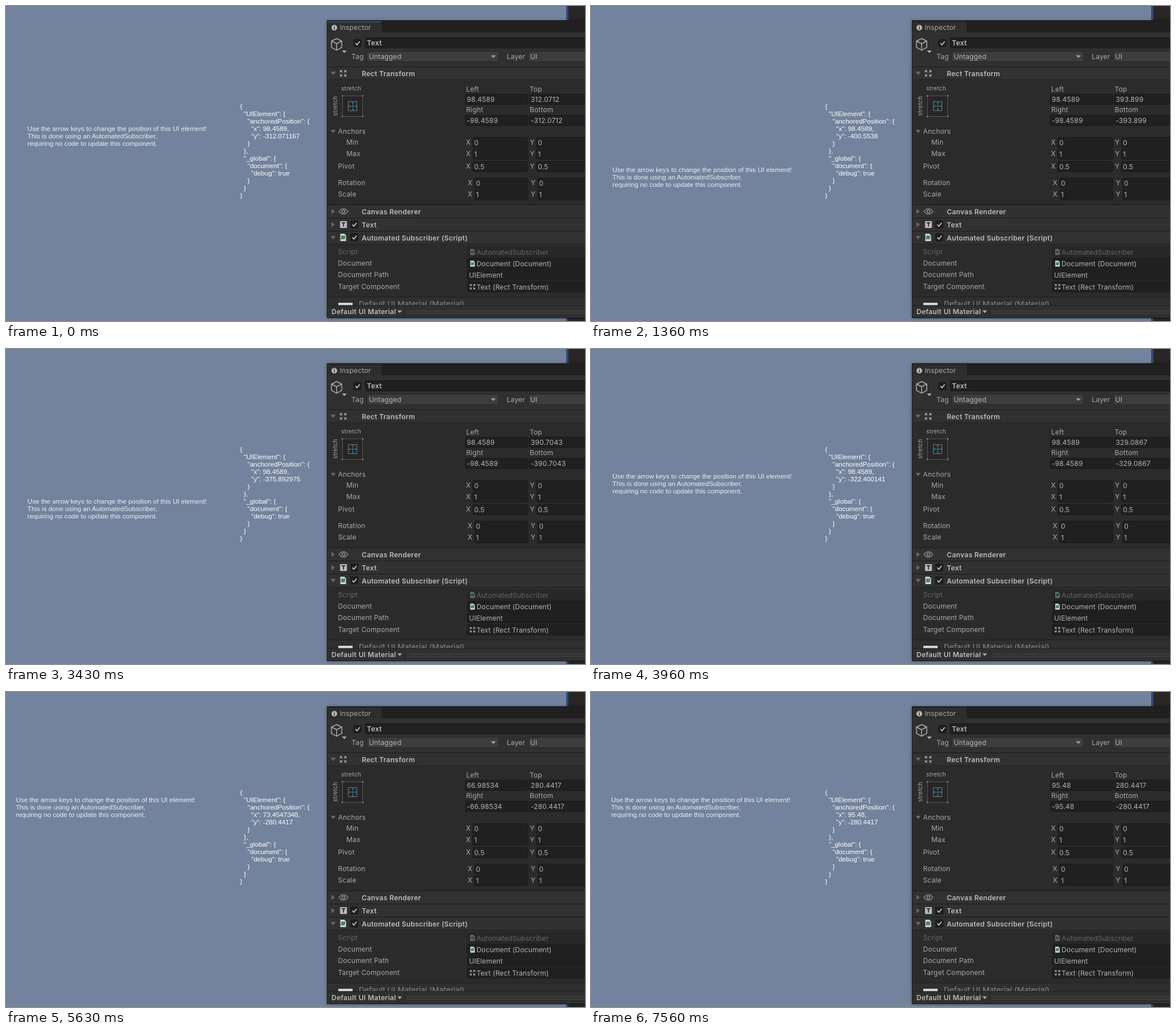
Write an HTML page that moves like this. It is 1014 px wide and 552 px high and loops after 8000 ms.

```html
<!DOCTYPE html>
<html lang="en">
<head>
<meta charset="utf-8">
<title>Inspector</title>
<style>
  html, body { margin: 0; width: 100%; height: 100%; overflow: hidden; background: #74839d; }
  svg { display: block; width: 1014px; height: 552px; }
  text { font: 12px Inter, sans-serif; letter-spacing: .15px; fill: #a9a9a9; white-space: pre; }
  .bold { font-weight: 600; letter-spacing: .3px; fill: #bcbcbc; }
  .value { fill: #b4b4b4; }
  .dim { fill: #666; }
  .tiny { font-size: 10px; letter-spacing: .3px; }
  .wide { font-size: 13.3px; fill: #8a8a8a; }
  .scene { font: 11.65px "Liberation Sans", Arial, sans-serif; letter-spacing: 0; fill: #fff; }
  .soft { fill: #eaedf1; }
</style>
</head>
<body>
<svg id="stage" viewBox="0 0 1014 552">
  <defs>
    <filter id="blur" x="-10%" y="-10%" width="120%" height="120%"><feGaussianBlur stdDeviation="3"/></filter>
    <clipPath id="materialClip"><rect x="563" y="511" width="451" height="13.5"/></clipPath>
  </defs>
</svg>
<script>
const stage = document.getElementById('stage');

function add(tag, attrs, parent = stage) {
  const node = document.createElementNS('http://www.w3.org/2000/svg', tag);
  for (const key in attrs) node.setAttribute(key, attrs[key]);
  parent.appendChild(node);
  return node;
}
const box = (x, y, width, height, fill, extra) => add('rect', { x, y, width, height, fill, ...extra });
const path = (d, fill, stroke = 'none', width = 1) =>
  add('path', { d, fill, stroke, 'stroke-width': width });
function label(x, y, content, cls = '', parent = stage) {
  const node = add('text', { x, y, class: cls }, parent);
  node.textContent = content;
  return node;
}
function field(x, y, content, end = 1020) {
  box(x + .5, y - 8.5, end - x - .5, 18, '#202020', { rx: 2.5, stroke: '#191919' });
  return label(x + 3, y + 5, content, 'value');
}
function foldout(y, open) {
  path(open ? `M568.5 ${y - 3}h9l-4.5 6z` : `M570 ${y - 4.5}v9l6 -4.5z`, '#666');
}
function checkbox(x, y) {
  box(x - 6.5, y - 6.5, 13, 13, '#1f1f1f', { rx: 2, stroke: '#171717' });
  path(`M${x - 3.5} ${y}l2.7 3l4.8 -6`, 'none', '#d0d0d0', 1.6);
}
function scriptIcon(x, y, scale = 1, opacity = 1) {
  const g = add('g', { transform: `translate(${x} ${y}) scale(${scale})`, opacity });
  add('path', { d: 'M-5 -6.5h7l3 3v10h-10z', fill: '#d0d6d0' }, g);
  add('path', { d: 'M-1.5 -3.5l-.8 7M1.8 -3.5l-.8 7M-3.5 -1.3h7M-3.8 1.5h7', stroke: '#1f6b33', 'stroke-width': 1.5 }, g);
}
function cornersIcon(x, y, s) {
  for (const [dx, dy] of [[-1, -1], [1, -1], [-1, 1], [1, 1]])
    path(`M${x + dx * s * .35} ${y + dy * s * .35}L${x + dx * s} ${y + dy * s}` +
      `M${x + dx * s * .3} ${y + dy * s}H${x + dx * s}V${y + dy * s * .3}`, 'none', '#b5b5b5', 1.1);
}
function header(y, height, title, open) {
  box(563, y, 451, height, '#313131');
  box(563, y - 1, 451, 1, '#1b1b1b');
  foldout(y + height / 2, open);
  label(623, y + height / 2 + 4.5, title, 'bold');
}

// Scene behind the panel
box(0, 0, 1014, 552, '#74839d');
box(981, 0, 4, 552, '#2d4a80');
box(985, 0, 29, 552, '#282626');

const message = add('g', {});
['Use the arrow keys to change the position of this UI element!',
 'This is done using an AutomatedSubscriber,',
 'requiring no code to update this component.'
].forEach((line, i) => label(37.6, 218.5 + i * 13, line, 'scene soft', message));

const jsonLines = ['{', ' "UIElement": {', '  "anchoredPosition": {', '', '', '  }', ' },',
  ' "_global": {', '  "document": {', '   "debug": true', '  }', ' }', '}'
].map((line, i) => {
  const depth = i === 3 || i === 4 ? 3 : line.search(/\S/);
  return label(410 + depth * 6.5, 180.2 + i * 13.02, line.trim(), 'scene');
});

// Panel frame and tab
box(562, 26, 470, 521, '#000', { opacity: .4, filter: 'url(#blur)' });
box(562, 25, 460, 522, '#191919');
box(563, 26, 451, 20, '#202020');
box(563, 27, 95, 19, '#2d2d2d');
const focusLine = box(563, 27, 95, 1.5, '#2c5d87');
box(563, 46, 451, 500, '#2b2b2b');
add('circle', { cx: 575, cy: 38, r: 5, fill: '#b8b8b8' });
path('M575 37v4M575 34.5v1.4', 'none', '#2d2d2d', 1.5);
label(584.5, 42, 'Inspector');

// Object header
box(563, 46, 451, 60, '#303030');
path('M579 57l9 4.5v11l-9 5l-9 -5v-11zM570 61.5l9 4.5l9 -4.5M579 66v11', 'none', '#b5b5b5', 1.4);
path('M588.5 78h8l-4 4.5z', '#b0b0b0');
checkbox(615.5, 65);
box(629, 55.5, 400, 18, '#202020', { rx: 2.5, stroke: '#191919' });
label(632, 69.3, 'Text', 'bold');
label(605, 93.3, 'Tag');
box(632, 79.5, 231, 18, '#3d3d3d', { rx: 2.5, stroke: '#262626' });
label(635.5, 92.5, 'Untagged', 'value');
path('M849 86.5h9l-4.5 4.5z', '#a0a0a0');
label(877, 93.3, 'Layer');
box(915, 79.5, 110, 18, '#3d3d3d', { rx: 2.5, stroke: '#262626' });
label(918, 92.5, 'UI', 'value');

// Rect Transform
header(107, 22, 'Rect Transform', true);
box(563, 128.5, 451, 1, '#252525');
cornersIcon(590.5, 118, 5);
label(587, 148, 'stretch', 'tiny');
add('text', { transform: 'translate(580 192.5) rotate(-90)', class: 'tiny' }).textContent = 'stretch';
box(589.5, 157.5, 35, 36, '#262626', { stroke: '#555' });
box(599.5, 167.5, 15, 16, 'none', { stroke: '#777' });
path('M600 175.5H614.5M607.5 168V183M602.5 173.5l-2 2l2 2M612.5 173.5l2 2l-2 2' +
  'M605.5 170.5l2 -2l2 2M605.5 180.5l2 2l2 -2', 'none', '#277c9b');
for (const x of [589, 625]) for (const y of [157.5, 193.5]) box(x - 1, y - 1, 2, 2, '#d98b25');

label(806, 149.5, 'Left');
label(917, 149.5, 'Top');
label(806, 186.3, 'Right');
label(917, 186.3, 'Bottom');
const left = field(804, 163, '', 914);
const top_ = field(916, 163, '');
const right = field(804, 200, '', 914);
const bottom = field(916, 200, '');

foldout(220, true);
label(581.5, 224.3, 'Anchors');
for (const [x, y, name, value, shift] of [
  [596, 239, 'Min', '0', 0], [596, 259, 'Max', '1', 0], [581.5, 281, 'Pivot', '0.5', 0],
  [581.5, 310, 'Rotation', '0', 3], [581.5, 330, 'Scale', '1', 3]]) {
  label(x, y + 4.3, name);
  label(805.5 + shift, y + 4.3, 'X');
  field(817 + shift, y, value, 914);
  label(917.5 + shift / 2, y + 4.3, 'Y');
  field(928.5 + shift * .7, y, value);
}

// Component list
header(349, 22, 'Canvas Renderer', false);
path('M583 360q8 -10 16 0q-8 10 -16 0z', 'none', '#a0a0a0', 1.2);
add('circle', { cx: 591, cy: 360, r: 2.7, fill: 'none', stroke: '#a0a0a0', 'stroke-width': 1.3 });
header(372, 22, 'Text', false);
box(585, 377, 12, 12, '#b9b9b9', { rx: 1 });
path('M588 380h6M591 380v6.5', 'none', '#303030', 1.8);
checkbox(610, 383);
header(395, 22, 'Automated Subscriber (Script)', true);
box(563, 416.5, 451, 1, '#252525');
scriptIcon(590.5, 405.5);
checkbox(610, 405.5);

for (const [y, name, value, x, cls] of [
  [431, 'Script', 'AutomatedSubscriber', 824, 'dim'], [451, 'Document', 'Document (Document)', 824, ''],
  [471, 'Document Path', 'UIElement', 811, ''], [492, 'Target Component', 'Text (Rect Transform)', 824, '']]) {
  label(581.5, y + 4, name, cls);
  box(808, y - 9, 220, 18, cls ? '#272727' : '#202020', { rx: 2.5, stroke: cls ? '#242424' : '#191919' });
  label(x, y + 4.8, value, cls || 'value');
}
scriptIcon(817, 431, .8, .4);
scriptIcon(817, 451.5, .8);
cornersIcon(817, 492, 4);

// Material strip and footer
box(563, 509.5, 451, 1, '#1b1b1b');
box(563, 510.5, 451, 14, '#2f2f2f');
const material = add('g', { 'clip-path': 'url(#materialClip)' });
label(618, 527, 'Default UI Material (Material)', 'wide', material);
box(582, 520, 25, 4.5, '#d5d5d5');
box(563, 524.5, 451, 1, '#1a1a1a');
box(563, 525.5, 451, 20.5, '#303030');
label(570, 540.3, 'Default UI Material', 'bold');
path('M685.5 533.5h8l-4 4.5z', '#b0b0b0');
box(698, 525.5, 1, 20.5, '#222');
path('M702 534.5H1014M702 538.5H1014', 'none', '#474747');

// Motion: [ms, value] with straight runs between
const LOOP = 8000, STEP = 200 / 3, START = 500, PIXELS_PER_UNIT = .817;
const timeOf = tick => START + tick * STEP;
const tracks = {
  x: [[5185, 98.4589], [5500, 66.98534], [5533, 63.7], [timeOf(77), 73.4547348], [6040, 114.1],
      [6455, 74.3], [6500, 78.74718], [timeOf(92), 93.69272], [6850, 115.4], [7245, 76], [7440, 95.48]],
  y: [[475, 312.071167], [1300, 393.899], [timeOf(13), 400.5538], [1752, 439.0962],
      [2816, 439.0962], [3300, 390.7043], [timeOf(44), 375.892975], [4385, 280.4417]]
};

function valueAt(track, time) {
  const next = track.findIndex(([t]) => t > time + .01);
  if (next === 0) return track[0][1];
  if (next < 0) return track[track.length - 1][1];
  const [t0, v0] = track[next - 1], [t1, v1] = track[next];
  return v0 + (v1 - v0) * Math.max(0, time - t0) / (t1 - t0);
}
const digits = (value, count) => String(Number(value.toPrecision(count)));

// The panel refreshes every third tick and shows the tick before.
const panelTick = tick => Math.floor((tick - 1) / 3) * 3;

function draw(time) {
  const tick = Math.floor((time + 8 - START) / STEP);
  const now = timeOf(tick), seen = timeOf(panelTick(tick));
  const x = valueAt(tracks.x, now), y = valueAt(tracks.y, now);
  const dx = (x - tracks.x[0][1]) * PIXELS_PER_UNIT;
  const dy = (y - tracks.y[0][1]) * PIXELS_PER_UNIT;
  message.setAttribute('transform', `translate(${dx.toFixed(2)} ${dy.toFixed(2)})`);
  jsonLines[3].textContent = `"x": ${digits(x, 9)},`;
  jsonLines[4].textContent = `"y": -${digits(y, 9)}`;

  const panelX = digits(valueAt(tracks.x, seen), 7), panelY = digits(valueAt(tracks.y, seen), 7);
  left.textContent = panelX;
  right.textContent = '-' + panelX;
  top_.textContent = panelY;
  bottom.textContent = '-' + panelY;
  focusLine.style.display = tick < 0 ? '' : 'none';
}

const begin = performance.now();
function frame() {
  draw((performance.now() - begin) % LOOP);
  requestAnimationFrame(frame);
}
frame();
</script>
</body>
</html>
```
